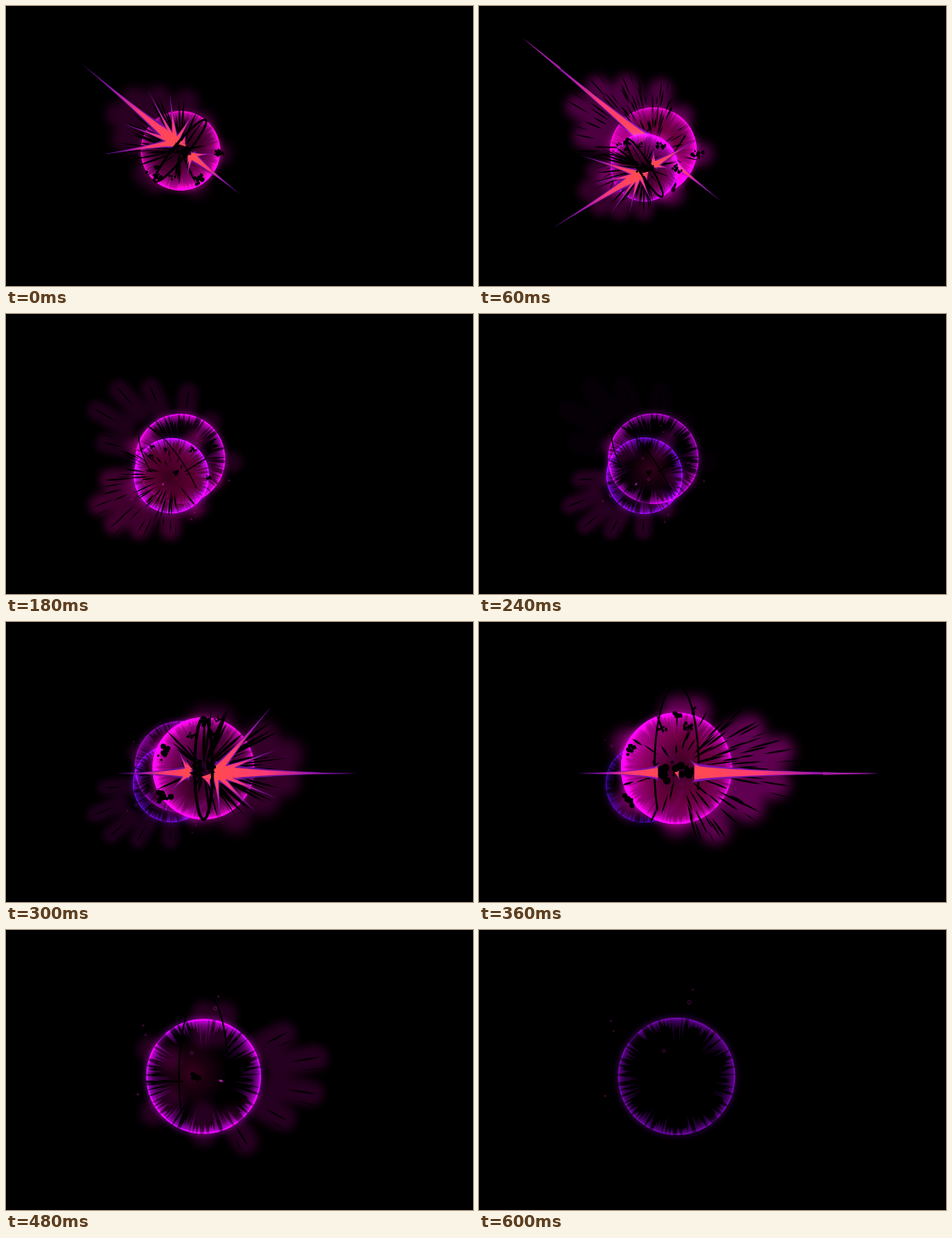
Animation, 549 px wide and 329 px high, one loop 660 ms. Source, as an HTML page with a canvas:

```html
<!DOCTYPE html>
<html lang="en">
<head>
<meta charset="utf-8">
<title>Neon bursts</title>
<style>
  html, body { margin: 0; width: 100%; height: 100%; overflow: hidden; background: #000; }
  canvas { display: block; }
</style>
</head>
<body>
<canvas id="stage" width="549" height="329"></canvas>
<script>
const ctx = document.getElementById('stage').getContext('2d');
const STEP = 60, STEPS = 11, LIFE = 6, TAU = Math.PI * 2, DEG = Math.PI / 180;

// Every burst plays the same life, turned, mirrored and scaled.
const BURSTS = [
  { start: 0, x: 205, y: 170, dir: 219.5, size: 0.78, flip: 1, reach: 1.09, hue: 312, seed: 41, smoke: 0.8 },
  { start: 1, x: 194.5, y: 190, dir: 148.6, size: 0.665, flip: -1, reach: 1.07, hue: 289, seed: 77, smoke: 1.1 },
  { start: 5, x: 232.3, y: 172, dir: 0, size: 1, flip: 1, reach: 1, hue: 305, seed: 19, smoke: 1 }
];

// One entry per age.
const RADIUS = [60, 65.5, 66.6, 67.6, 68.3, 69];
const LIGHT = [44, 41, 38, 37, 31, 24];
const STREAK = [0.6, 0.65, 0.7, 0.66, 0.56, 0.44];
const SMOKE = ['#34002a', '#600050', '#40002e', '#260020', '#1c001a'];
const SPREAD = [0.8, 0.97, 1.03, 1.06, 1.08];
const FILLS = [
  ['#1a0010', '#46002c', '#7a0668'],
  ['#38001c', '#680038', '#880070'],
  ['#3c001c', '#560028', '#600844']
];

const LOBES = [[95, -50], [133, -22], [128, 20], [95, 50], [50, 78], [0, -74], [24, -74], [-64, -32], [-60, 43], [0, 68]];
const RAYS = [[80, -73, 6], [86, -22, 5], [88, 36, 4], [62, 52, 5], [20, 58, 4], [56, 15, 5], [181, 6, 9]];
const BACK_RAYS = [[-30, -22, 4], [-38, 26, 4], [-102, 6, 6]];
const SPLATS = [[-55, -20, 9], [-55, 38, 9], [2, -62, 7], [-17, -45, 5], [13, -48, 6], [-24, -4, 5], [20, -68, 4]];
const EMBERS = [[15, -87, 2], [19, -102, 0.8], [-15, -30, 1.7], [46, -50, 2.2], [-77, -65, 0.8], [-74, -53, 0.7], [-84, 23, 1]];

function random(seed) {
  return () => (seed = seed * 16807 % 2147483647) / 2147483647;
}

function at(angle, r, side = 0) {
  const c = Math.cos(angle), s = Math.sin(angle);
  return [r * c - side * s, r * s + side * c];
}

function circle(x, y, r) {
  ctx.moveTo(x + r, y);
  ctx.arc(x, y, r, 0, TAU);
}

// A sliver lying along a radius.
function sliver(angle, from, to, width) {
  const mid = from + (to - from) * 0.55, end = at(angle, from);
  ctx.moveTo(...end);
  ctx.quadraticCurveTo(...at(angle, mid, width), ...at(angle, to));
  ctx.quadraticCurveTo(...at(angle, mid, -width), ...end);
}

function arc(rx, ry, from, to, width) {
  ctx.beginPath();
  ctx.ellipse(0, 0, rx, ry, 0, from * DEG, to * DEG);
  ctx.lineWidth = width;
  ctx.strokeStyle = '#000';
  ctx.stroke();
}

function spike(ox, oy, tx, ty, width, paint) {
  const a = Math.atan2(ty - oy, tx - ox), len = Math.hypot(tx - ox, ty - oy);
  ctx.save();
  ctx.translate(ox, oy);
  ctx.rotate(a);
  ctx.beginPath();
  ctx.moveTo(0, -width);
  ctx.quadraticCurveTo(len * 0.25, -width * 0.15, len, 0);
  ctx.quadraticCurveTo(len * 0.25, width * 0.15, 0, width);
  if (!paint) {
    paint = ctx.createLinearGradient(0, 0, len, 0);
    paint.addColorStop(0, '#ff4a50');
    paint.addColorStop(0.35, '#ff3a74');
    paint.addColorStop(0.65, '#a018a4');
    paint.addColorStop(1, '#400c70');
  }
  ctx.fillStyle = paint;
  ctx.fill();
  ctx.restore();
}

function splat(x, y, r, rnd) {
  ctx.beginPath();
  for (let i = 0; i < 12; i++) {
    const d = r * rnd(), a = rnd() * TAU;
    circle(x + d * Math.cos(a), y + d * Math.sin(a), r * (0.1 + 0.3 * rnd()));
  }
  ctx.fillStyle = '#000';
  ctx.fill();
}

function drawSmoke(b, age) {
  if (age > 4) return;
  const inner = age < 3 ? 0.3 : 0.62, k = SPREAD[age] * b.reach;
  ctx.save();
  ctx.globalCompositeOperation = 'lighter';
  ctx.globalAlpha = Math.min(1, b.smoke * (age > 3 && b.flip > 0 ? 0.3 : 1));
  ctx.filter = `blur(${(age < 3 ? 7 : 5) * b.size}px)`;
  ctx.lineCap = 'round';
  ctx.lineWidth = age < 3 ? 36 : 30;
  ctx.strokeStyle = SMOKE[age];
  ctx.beginPath();
  for (const [x, y] of LOBES) {
    ctx.moveTo(x * inner * k, y * inner * k);
    ctx.lineTo(x * 0.93 * k, y * 0.93 * k);
  }
  ctx.stroke();
  ctx.restore();
}

function drawFill(age, R, color) {
  ctx.save();
  ctx.beginPath();
  circle(0, 0, R);
  ctx.clip();
  if (age < 3) {
    const g = ctx.createRadialGradient(0, 0, 0, 0, 0, R);
    FILLS[age].forEach((c, i) => g.addColorStop([0.05, 0.6, 0.94][i], c));
    g.addColorStop(1, color(0.6));
    ctx.globalAlpha = age < 2 ? 0.85 : 0.75;
    ctx.fillStyle = g;
    ctx.fillRect(-R, -R, 2 * R, 2 * R);
    const shine = ctx.createLinearGradient(-R, -R * 0.3, -R * 0.1, 0);
    shine.addColorStop(0, color(age < 2 ? 0.45 : 0.1));
    shine.addColorStop(1, color(0));
    ctx.globalCompositeOperation = 'lighter';
    ctx.fillStyle = shine;
    ctx.fillRect(-R, -R, 2 * R, 2 * R);
  } else if (age === 3) {
    const g = ctx.createRadialGradient(-14, -4, 4, -14, -4, 42);
    g.addColorStop(0, '#30001a');
    g.addColorStop(0.6, '#24001480');
    g.addColorStop(1, '#24001400');
    ctx.globalCompositeOperation = 'lighter';
    ctx.fillStyle = g;
    ctx.fillRect(-R, -R, 2 * R, 2 * R);
  }
  ctx.restore();
}

function drawRing(b, age, R, color) {
  const rnd = random(b.seed);
  ctx.save();
  ctx.globalCompositeOperation = 'lighter';
  const fade = ctx.createRadialGradient(0, 0, R * 0.45, 0, 0, R);
  fade.addColorStop(0, color(0));
  fade.addColorStop(0.55, color(0.3));
  fade.addColorStop(1, color(0.8));
  ctx.fillStyle = fade;
  ctx.beginPath();
  for (let i = 0; i < 170; i++) {
    const a = rnd() * TAU, clump = 0.65 + 0.35 * Math.sin(a * 7 + b.seed);
    const len = R * (0.08 + STREAK[age] * clump * (0.2 + 0.8 * rnd() ** 2));
    ctx.moveTo(...at(a, R, -1.8));
    ctx.lineTo(...at(a, R - len));
    ctx.lineTo(...at(a, R, 1.8));
  }
  ctx.globalAlpha = age < 2 ? 0.35 : 0.85;
  ctx.fill();

  // Young rings are dim on the side the burst shoots towards.
  const rim = ctx.createLinearGradient(-R, 0, R, 0);
  rim.addColorStop(0, color(0.6));
  rim.addColorStop(1, color(age < 2 ? 0.15 : 0.6));
  ctx.globalAlpha = 1;
  ctx.beginPath();
  circle(0, 0, R - 1);
  ctx.strokeStyle = rim;
  ctx.lineWidth = 5;
  ctx.filter = 'blur(3px)';
  ctx.stroke();
  ctx.filter = 'none';
  ctx.lineWidth = 2;
  ctx.globalAlpha = 0.7;
  ctx.stroke();
  ctx.restore();
}

function drawSlits(b, age) {
  const rnd = random(b.seed + 100), count = [54, 70, 56][age] || 0;
  ctx.fillStyle = '#000';
  ctx.beginPath();
  for (let i = 0; i < count; i++) {
    const a = i % 3 ? (rnd() - 0.5) * 2.6 : rnd() * TAU;
    const front = 0.6 + 0.4 * Math.max(0, Math.cos(a));
    const from = (age ? 22 + 70 * rnd() : 10) * front;
    sliver(a, from, from + (age ? 18 + 26 * rnd() : 38 + 58 * rnd()) * front, age ? 1.5 + 1.3 * rnd() : 1.4 + 2 * rnd());
  }
  if (age > 0 && age < 5) {
    for (const [x, y] of LOBES.slice(0, 5)) {
      const r = Math.hypot(x, y) * b.reach, a = Math.atan2(y, x);
      sliver(a, r * 0.76, r * 1.04, 2);
      sliver(a + 0.1, r * 0.86, r * 1.08, 1.2);
    }
  }
  ctx.fill();
}

function drawStar(b) {
  const k = b.reach, rnd = random(b.seed + 7);
  for (const [x, y, r] of SPLATS) splat(x * 0.85, y * 0.85, r, rnd);
  for (const paint of ['#6a0e9c', null]) {
    const grow = paint ? 1.5 : 1;
    for (const [x, y, w] of RAYS) spike(14, 5, x * k, y * k, w * grow, paint);
    for (const [x, y, w] of BACK_RAYS) spike(-17, 5, x * k, y * k, w * grow, paint);
  }
  splat(-4, 0, 9, rnd);
  splat(9, -4, 8, rnd);
  splat(-7, 8, 6, rnd);
  spike(3, 8, 10, 27, 6);
  spike(9, 10, -3, 14, 3);
  spike(-16, 2, -23, -14, 3);
  arc(10.5, 60, 0, 360, 3.4);
}

function drawLance(b) {
  const k = b.reach, rnd = random(b.seed + 9);
  arc(26, 98, 150, 375, 2.2);
  for (const [x, y, r] of SPLATS) splat(x, y, r, rnd);
  splat(-10, 3, 12, rnd);
  splat(8, 4, 13, rnd);
  for (const paint of ['#8010b0', null]) {
    const grow = paint ? 1.4 : 1;
    spike(21, 5, 238 * k, 6, 8 * grow, paint);
    spike(-22, 5, -116 * k, 6, 6 * grow, paint);
    spike(28, 2, 15, -11, 4 * grow, paint);
    spike(28, 8, 17, 18, 4 * grow, paint);
    spike(-28, 5, -20, -7, 3 * grow, paint);
    spike(-28, 6, -21, 15, 3 * grow, paint);
  }
  ctx.beginPath();
  ctx.moveTo(172 * k, 4.6);
  ctx.lineTo(238 * k, 6);
  ctx.lineTo(172 * k, 7.8);
  ctx.fillStyle = '#a01ca0';
  ctx.fill();
  spike(0, 4, 4, 15, 3);
}

function drawRemains(b, age) {
  const rnd = random(b.seed + 11);
  if (age < 4) {
    arc(29, 100, 155, 250, 1.8);
    arc(29, 100, 290, 345, 1.8);
    ctx.fillStyle = '#000';
    ctx.fillRect(-68, 5, 44, 2);
    splat(-11, 1, 7, rnd);
    if (age === 2) for (const [x, y, r] of SPLATS) splat(x, y, r * 0.7, rnd);
    ctx.beginPath();
    sliver(0.25, 18, 24, 3);
    ctx.fillStyle = '#a01c98';
    ctx.fill();
  }
  if (age > 2) {
    const k = 0.8 + 0.04 * age;
    ctx.beginPath();
    for (const [x, y, r] of EMBERS) circle(x * k, y * k, r);
    ctx.lineWidth = 0.8;
    ctx.strokeStyle = age < 5 ? '#701060' : '#580850';
    ctx.stroke();
  }
}

function drawBurst(b, age) {
  const R = RADIUS[age], hue = b.hue - 5 * age;
  const color = alpha => `hsla(${hue},96%,${LIGHT[age]}%,${alpha})`;
  ctx.save();
  ctx.translate(b.x, b.y);
  ctx.rotate(b.dir * DEG);
  ctx.scale(b.size, b.size * b.flip);
  drawSmoke(b, age);
  drawFill(age, R, color);
  drawRing(b, age, R, color);
  drawSlits(b, age);
  if (age === 0) drawStar(b);
  else if (age === 1) drawLance(b);
  else drawRemains(b, age);
  ctx.restore();
}

function draw(step) {
  ctx.fillStyle = '#000';
  ctx.fillRect(0, 0, 549, 329);
  for (const b of BURSTS) {
    const age = step - b.start;
    if (age >= 0 && age < LIFE) drawBurst(b, age);
  }
}

let origin, shown;
function tick(now) {
  origin ??= now;
  const step = Math.floor((now - origin) / STEP) % STEPS;
  if (step !== shown) draw(shown = step);
  requestAnimationFrame(tick);
}
requestAnimationFrame(tick);
</script>
</body>
</html>
```
